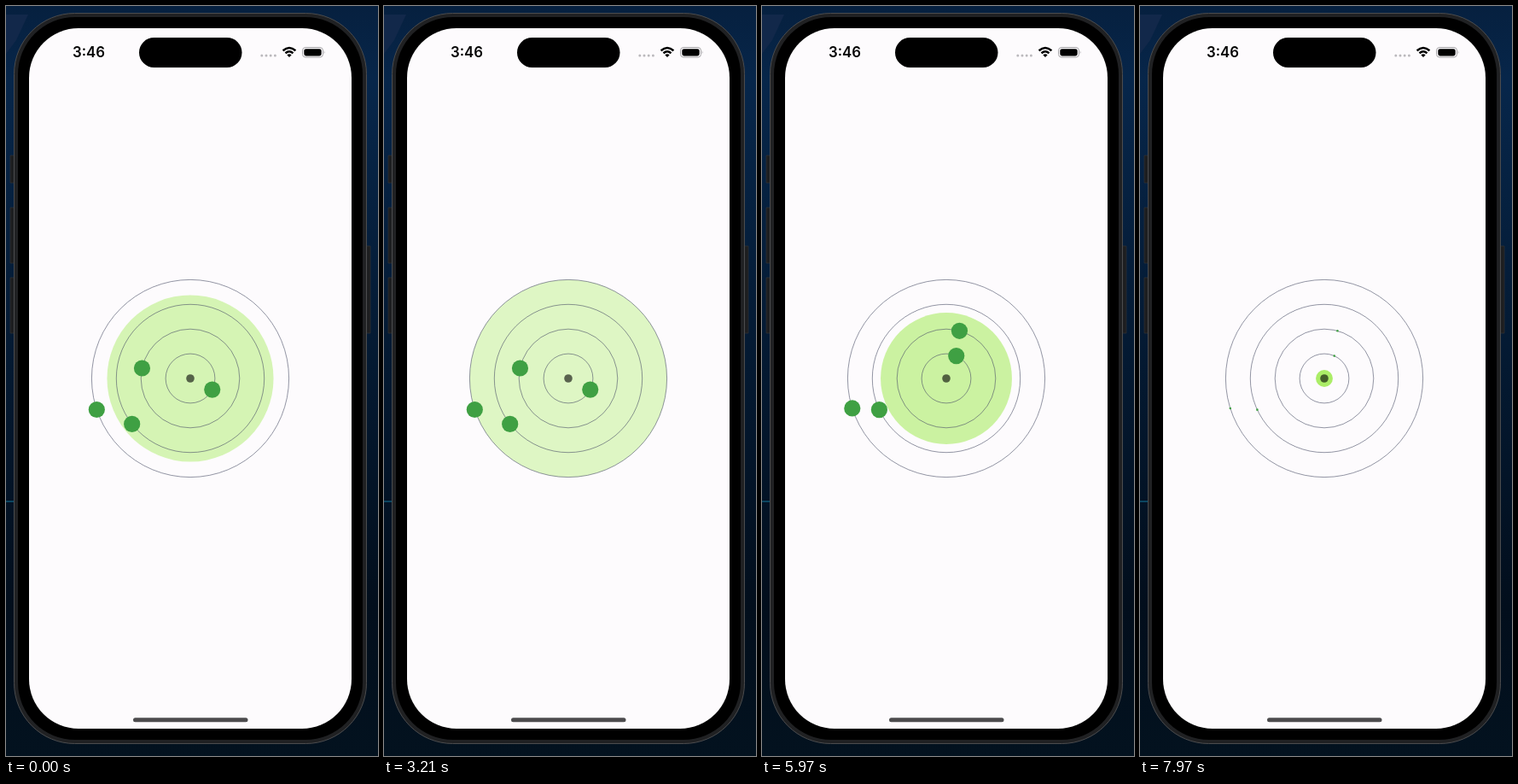
Animation of 436 by 878 pixels, one loop 8 s. Source, as an HTML page:

```html
<!DOCTYPE html>
<html lang="en">
<head>
<meta charset="utf-8">
<title>Radar pulse</title>
<style>
  html, body { margin: 0; width: 100%; height: 100%; overflow: hidden; background: #03101f; }
  svg { display: block; width: 100vw; height: 100vh; }
  text { font: 600 16.8px Inter, "Liberation Sans", sans-serif; }
</style>
</head>
<body>
<svg viewBox="0 0 436 878">
  <defs>
    <linearGradient id="wall" x1="0" y1="0" x2="0" y2="1">
      <stop offset="0" stop-color="#06203f"/>
      <stop offset=".1" stop-color="#07264a"/>
      <stop offset=".45" stop-color="#041a33"/>
      <stop offset=".8" stop-color="#020e1c"/>
      <stop offset="1" stop-color="#03121f"/>
    </linearGradient>
  </defs>
  <rect width="436" height="878" fill="url(#wall)"/>
  <path d="M0 10H26L12 40 0 56Z" fill="#12284a"/>
  <path d="M0 579H9V581H0Z" fill="#0b4560"/>

  <g fill="#1d1e20" stroke="#323335" stroke-width=".7">
    <path d="M5 175H11V207H5ZM5 236H11V301H5ZM5 318H11V383H5ZM421 281H427V383H421Z"/>
  </g>
  <rect x="9.5" y="8.5" width="413" height="855" rx="71" fill="#202123" stroke="#4b4c4e"/>
  <rect x="14" y="13" width="404" height="846" rx="67" fill="#000"/>
  <rect x="27" y="26" width="378" height="820" rx="58" fill="#fdfbfd"/>
  <rect x="156" y="37" width="120.5" height="35" rx="17.5"/>
  <text x="78" y="60">3:46</text>
  <g fill="#bbb9bd">
    <circle cx="299.8" cy="58" r="1.5"/><circle cx="305" cy="58" r="1.5"/>
    <circle cx="310.2" cy="58" r="1.5"/><circle cx="315.4" cy="58" r="1.5"/>
  </g>
  <g fill="none" stroke="#000" stroke-width="2.5">
    <path d="M324.6 52.3Q332 45.8 339.4 52.3"/>
    <path d="M327.5 55.2Q332 51.3 336.5 55.2"/>
  </g>
  <path d="M329.3 57.3Q332 55 334.7 57.3L332 60Z"/>
  <rect x="347.5" y="48.5" width="24" height="11.5" rx="3.6" fill="none" stroke="#a5a4a7"/>
  <rect x="349.3" y="50.2" width="20.4" height="8.2" rx="2.3"/>
  <path d="M372.8 52.3Q374.4 54.2 372.8 56.2Z" fill="#a5a4a7"/>
  <rect x="149" y="833.3" width="134.5" height="5" rx="2.5" fill="#4c4b4d"/>

  <g id="radar" transform="translate(216 436)">
    <circle id="pulse" fill="#a6ec5e"/>
  </g>
</svg>
<script>
  const LOOP = 8000, START = 18, RISE = 48, FALL = 24, MOVE = 123;
  const CYCLE = RISE + FALL, RING = 28.9, DOT = 9.6;
  // Angles in degrees, from the inner ring outwards.
  const ANGLES = [[27, 192, 142, 161.6], [294, 285.5, 155, 162.4]];

  const radar = document.getElementById('radar');
  const pulse = document.getElementById('pulse');
  const circle = attrs => {
    const el = document.createElementNS('http://www.w3.org/2000/svg', 'circle');
    for (const key in attrs) el.setAttribute(key, attrs[key]);
    return radar.appendChild(el);
  };

  for (let i = 1; i <= 4; i++) {
    circle({ r: RING * i, fill: 'none', stroke: '#4c5068', 'stroke-opacity': .6, 'stroke-width': 1 });
  }
  circle({ r: 4.8, fill: '#000', 'fill-opacity': .6 });
  const dots = ANGLES[0].map(() => circle({ fill: '#3fa043' }));

  // Steps run in threes of 20, 20 and 100 ms; the first pose is held longer.
  function stepAt(ms) {
    if (ms < 150) return 0;
    if (ms < 250) return 1;
    const u = ms - 90, v = u % 140;
    return 3 * Math.floor(u / 140) + (v < 20 ? 0 : v < 40 ? 1 : 2) - 2;
  }

  // A slow, nearly even growth followed by a quick smooth shrink.
  function scaleAt(step) {
    const age = (step - START + CYCLE) % CYCLE;
    if (age < RISE) return (age / RISE) ** 1.18;
    const x = (age - RISE) / FALL;
    return 1 - x * x * (3 - 2 * x);
  }

  function draw(ms) {
    const step = stepAt(ms), scale = scaleAt(step);
    pulse.setAttribute('r', RING * 4 * scale);
    pulse.setAttribute('fill-opacity', 1 - .64 * scale);

    const size = DOT * Math.min(1, 1.55 * scale);
    const angles = ANGLES[step < MOVE ? 0 : 1];
    dots.forEach((dot, i) => {
      const a = angles[i] * Math.PI / 180, r = RING * (i + 1);
      dot.setAttribute('cx', r * Math.cos(a));
      dot.setAttribute('cy', r * Math.sin(a));
      dot.setAttribute('r', size);
    });
  }

  const begin = performance.now();
  function tick() {
    draw((performance.now() - begin) % LOOP);
    requestAnimationFrame(tick);
  }
  tick();
</script>
</body>
</html>
```
